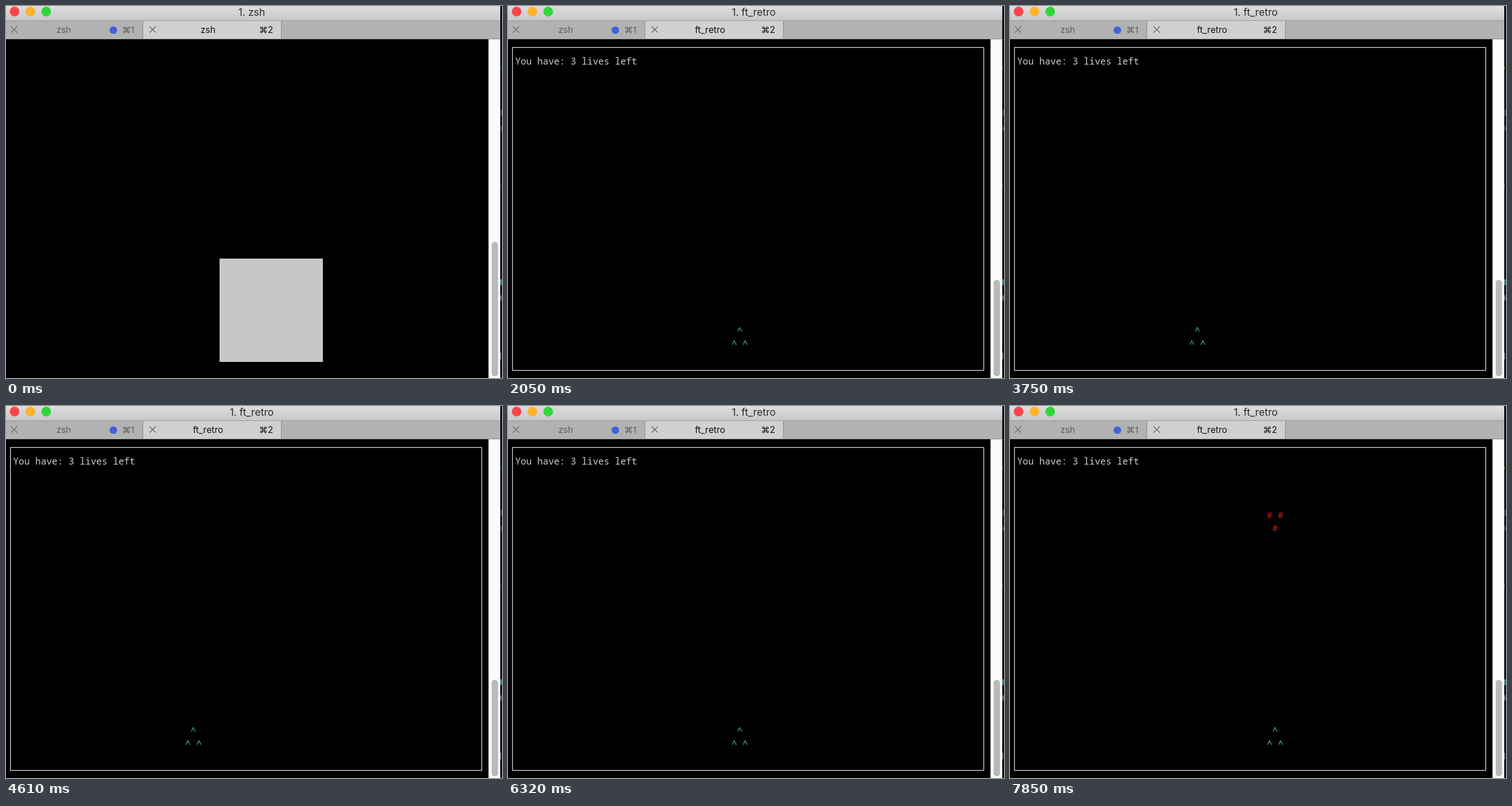
Animation of 864x648 px, one loop 8 s. Source, as an HTML page with a canvas:

```html
<!DOCTYPE html>
<html lang="en">
<head>
<meta charset="utf-8">
<title>Terminal game</title>
<style>
html, body { margin: 0; width: 100%; height: 100%; overflow: hidden; background: #000; }
canvas { display: block; width: 864px; height: 648px; }
</style>
</head>
<body>
<canvas id="stage" width="864" height="648"></canvas>
<script>
const ctx = document.getElementById("stage").getContext("2d");
const LOOP = 8000, GAME_START = 340, TITLE_CHANGE = 1020;
const COL = 9.66, ROW = 23.45;
const MONO = '500 16.1px "Noto Sans Mono", monospace';
const ui = size => `${size}px Inter, sans-serif`;
const TEXT = "#cdcdcd", TEAL = "#40c6bd", RED = "#c41c1c";

// Ship column over time: [ms, column]
const shipPath = [[0, 43], [1600, 43], [1900, 41], [2560, 41], [3650, 33],
  [5400, 33], [6260, 41], [6700, 41], [7650, 47], [LOOP, 47]];

// Each enemy enters on row 1 and falls at a steady rate
const enemies = [{ col: 41, start: 4680 }, { col: 47, start: 7540 }];
const FALL_MS = 75, LAST_ROW = 21;

function rect(x, y, w, h, color) {
  ctx.fillStyle = color;
  ctx.fillRect(x, y, w, h);
}

function dot(x, y, r, color) {
  ctx.fillStyle = color;
  ctx.beginPath();
  ctx.arc(x, y, r, 0, Math.PI * 2);
  ctx.fill();
}

function label(str, x, y, size, color) {
  ctx.font = ui(size);
  ctx.textAlign = "center";
  ctx.fillStyle = color;
  ctx.fillText(str, x, y);
}

function cell(str, col, row, color) {
  ctx.font = MONO;
  ctx.textAlign = "left";
  ctx.fillStyle = color;
  ctx.fillText(str, 2.8 + col * COL, 102 + (row - 1) * ROW);
}

function cross(x, y) {
  const r = 5.5;
  ctx.strokeStyle = "#686868";
  ctx.lineWidth = 1.3;
  ctx.beginPath();
  ctx.moveTo(x - r, y - r);
  ctx.lineTo(x + r, y + r);
  ctx.moveTo(x + r, y - r);
  ctx.lineTo(x - r, y + r);
  ctx.stroke();
}

function columnAt(path, t) {
  const i = path.findIndex(p => p[0] > t);
  const [t0, c0] = path[i - 1], [t1, c1] = path[i];
  return Math.round(c0 + (c1 - c0) * (t - t0) / (t1 - t0));
}

function drawWindow(name) {
  const bar = ctx.createLinearGradient(0, 0, 0, 25);
  bar.addColorStop(0, "#dfdddf");
  bar.addColorStop(1, "#c9c7c9");
  rect(0, 0, 861, 25, bar);
  rect(0, 25, 861, 33, "#b2b2b2");
  rect(239, 26, 240, 31, "#d0d0d0");
  rect(0, 25, 861, 1, "#989898");
  rect(0, 57, 861, 1, "#8c8c8c");
  rect(238, 26, 1, 31, "#8c8c8c");
  rect(479, 26, 1, 31, "#8c8c8c");

  dot(15, 9.7, 8.5, "#fb464c");
  dot(42.5, 9.7, 8.5, "#fdb42c");
  dot(70, 9.7, 8.5, "#2fd83c");
  label("1. " + name, 428, 16.5, 17.6, "#2b2b2b");

  cross(14, 41);
  label("zsh", 100.5, 47, 15.4, "#5c5c5c");
  dot(187, 42, 6.6, "#3f63d9");
  label("⌘1", 213, 47, 15, "#5c5c5c");
  cross(255.5, 41);
  label(name, 352, 47, 15.6, "#111");
  label("⌘2", 453, 47, 15.3, "#111");
}

function drawScrollbar(top) {
  rect(840.5, 58, 20.5, 590, "#fafafa");
  ctx.fillStyle = "#b9b9b9";
  ctx.beginPath();
  ctx.roundRect(846, top, 11, 645 - top, 5.5);
  ctx.fill();
}

// Slivers of the window behind
function drawEdge() {
  rect(861, 106, 1, 3, "#2c7a4c");
  rect(862, 181, 2, 10, "#4c4674");
  rect(862, 209, 2, 9, "#454545");
  rect(861, 311, 1, 4, "#555");
  rect(861, 476, 3, 10, "#2c7a6c");
  rect(861, 504, 3, 9, "#4c4c4c");
  rect(861, 604, 2, 12, "#4c4c4c");
}

function drawGame(t) {
  ctx.strokeStyle = "#d2d2d2";
  ctx.lineWidth = 1.4;
  ctx.strokeRect(7.7, 72.3, 821, 562.5);
  cell("You have: 3 lives left", 1, 1, TEXT);

  for (const { col, start } of enemies) {
    const row = 1 + Math.floor((t - start) / FALL_MS);
    if (row < 1 || row > LAST_ROW) continue;
    cell("# #", col - 1, row, RED);
    cell("#", col, row + 1, RED);
  }

  const col = columnAt(shipPath, t);
  cell("^", col, 21, TEAL);
  cell("^ ^", col - 1, 22, TEAL);
}

function draw(t) {
  const playing = t >= GAME_START;
  rect(0, 0, 864, 648, "#000");
  drawWindow(t >= TITLE_CHANGE ? "ft_retro" : "zsh");
  drawScrollbar(playing ? 477 : 411);
  drawEdge();
  if (playing) drawGame(t);
  else rect(372, 440, 180, 180, "#c7c7c7");
}

const began = performance.now();
function tick() {
  draw((performance.now() - began) % LOOP);
  requestAnimationFrame(tick);
}
tick();
</script>
</body>
</html>
```
